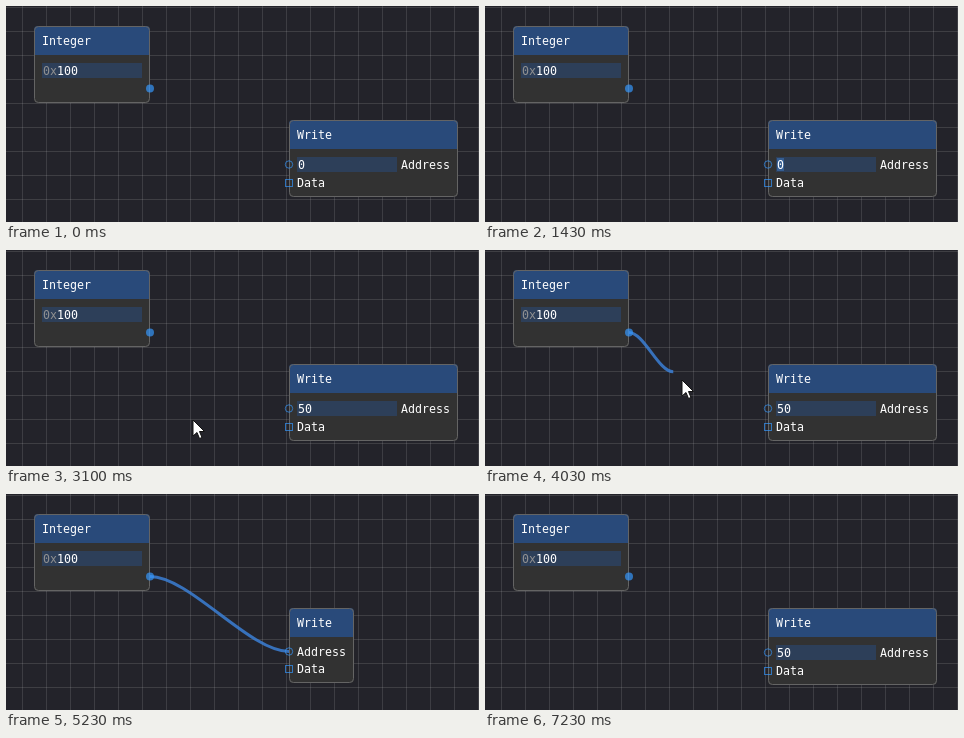
An HTML page with a canvas for the animation above (8000 ms loop, 473 by 216 pixels).

```html
<!DOCTYPE html>
<html>
<head>
<meta charset="utf-8">
<style>
  html, body { margin: 0; width: 100%; height: 100%; overflow: hidden; background: #23232a; }
  canvas { display: block; }
</style>
</head>
<body>
<canvas width="473" height="216"></canvas>
<script>
const ctx = document.querySelector('canvas').getContext('2d');
const LOOP = 8000, STEP = 200 / 3;
const PIN = 'rgba(53,150,250,.7)', PIN_HOVER = '#3596fa';

// Pointer visits as [time, x, y]
const visits = [
  [[500, 345, 189], [1033, 318, 158], [1100, 306, 158], [1300, 256, 158], [1433, 256, 158]],
  [[2966, 204, 205], [3433, 146, 83], [3700, 146, 83], [3766, 150, 86], [4033, 197, 130],
   [4566, 273, 151], [4633, 277, 152], [4766, 281, 157], [4966, 281, 157], [5233, 250, 216]],
  [[6033, 262, 205], [6433, 247, 153], [6633, 245, 148], [6766, 245, 148], [7233, 225, 216]]
];

const between = (t, from, to) => t >= from && t < to;

function pointerAt(t) {
  const path = visits.find(v => between(t, v[0][0], v[v.length - 1][0]));
  if (!path) return null;
  const i = path.findIndex(k => k[0] > t);
  const [t0, x0, y0] = path[i - 1], [t1, x1, y1] = path[i];
  const p = (t - t0) / (t1 - t0);
  return [x0 + (x1 - x0) * p, y0 + (y1 - y0) * p];
}

function rect(color, x, y, w, h) {
  ctx.fillStyle = color;
  ctx.fillRect(x, y, w, h);
}

function text(str, x, y, color = '#fff') {
  ctx.fillStyle = color;
  ctx.fillText(str, x, y);
}

function shape(points, fill, stroke) {
  ctx.beginPath();
  points.forEach(p => ctx.lineTo(...p));
  ctx.closePath();
  ctx.fillStyle = fill;
  ctx.strokeStyle = stroke;
  ctx.lineWidth = 1;
  ctx.fill();
  ctx.stroke();
}

function grid() {
  rect('#23232a', 0, 0, 473, 216);
  for (let x = 16; x < 473; x += 24) rect('rgba(200,200,200,.157)', x, 0, 1, 216);
  for (let y = 1; y < 216; y += 24) rect('rgba(200,200,200,.157)', 0, y, 473, 1);
}

function node(title, x, y, w, h, hover) {
  ctx.beginPath();
  ctx.roundRect(x, y, w, h, 4);
  ctx.fillStyle = hover ? '#4b4b4b' : '#323232';
  ctx.fill();
  ctx.beginPath();
  ctx.roundRect(x, y, w, 29, [4, 4, 0, 0]);
  ctx.fillStyle = hover ? '#4296fa' : '#294a7a';
  ctx.fill();
  ctx.beginPath();
  ctx.roundRect(x + .5, y + .5, w - 1, h - 1, 4);
  ctx.strokeStyle = '#646464';
  ctx.lineWidth = 1;
  ctx.stroke();
  text(title, x + 8, y + 19);
}

function field(x, y) {
  rect('rgba(41,74,122,.54)', x, y, 100, 15);
}

function circle(x, y, color, filled) {
  ctx.beginPath();
  ctx.arc(x, y, filled ? 4 : 3.7, 0, 7);
  ctx.fillStyle = ctx.strokeStyle = color;
  ctx.lineWidth = 1;
  filled ? ctx.fill() : ctx.stroke();
}

function wire(x, y, color) {
  const x0 = 144, y0 = 82.5, bend = Math.hypot(x - x0, y - y0) / 4;
  ctx.beginPath();
  ctx.moveTo(x0, y0);
  ctx.bezierCurveTo(x0 + bend, y0, x - bend, y, x, y);
  ctx.strokeStyle = color;
  ctx.lineWidth = 3;
  ctx.stroke();
}

function pointer(x, y) {
  x = Math.round(x);
  y = Math.round(y);
  if (x >= 291 && x < 391 && y >= 151 && y < 166) {
    ctx.globalCompositeOperation = 'difference';
    rect('#fff', x, y - 6, 1, 13);
    for (const end of [y - 7, y + 7]) {
      rect('#fff', x - 3, end, 3, 1);
      rect('#fff', x + 1, end, 3, 1);
    }
    ctx.globalCompositeOperation = 'source-over';
    return;
  }
  const arrow = [[0, 0], [0, 16], [4, 12.5], [6.5, 18.5], [9, 17.5], [6.5, 11.5], [11.5, 11.5]];
  shape(arrow.map(([dx, dy]) => [x + dx, y + dy]), '#fff', '#111');
}

function draw(t) {
  const linked = between(t, 4960, 6830);
  const snapped = between(t, 4695, 4960);
  const mouse = pointerAt(t);
  const pinY = linked ? 157.5 : 158.5;

  grid();
  if (linked || snapped) wire(283, pinY, between(t, 6495, 6830) ? '#4296fa' : 'rgba(61,133,224,.8)');
  else if (between(t, 3760, 4695)) wire(...pointerAt(t - 50), 'rgba(61,133,224,.8)');

  node('Integer', 28, 20, 116, 77);
  field(36, 57);
  text('0x', 37, 69, '#919191');
  text('100', 51, 69);
  circle(144, 82.5, between(t, 3425, 3760) ? PIN_HOVER : PIN, true);

  node('Write', 283, 114, linked ? 65 : 169, linked ? 75 : 77, between(t, 495, 1430));
  if (linked) {
    text('Address', 291, 162);
    text('Data', 291, 179);
  } else {
    const value = t < 1495 ? '0' : t < 1630 ? '5' : '50';
    field(291, 151);
    if (between(t, 1160, 1495)) rect('rgba(66,150,250,.35)', 292, 152, 7, 13);
    text(value, 292, 163);
    if (between(t, 1495, 2295)) rect('#fff', 292 + 7 * value.length, 153, 1, 11);
    text('Address', 395, 163);
    text('Data', 291, 181);
  }
  circle(283, pinY, snapped ? PIN_HOVER : PIN);
  ctx.strokeStyle = PIN;
  ctx.strokeRect(279.5, linked ? 171.5 : 173.5, 7, 7);

  if (mouse) pointer(...mouse);
}

function frame() {
  const t = performance.now() % LOOP;
  ctx.font = '11.63px "DejaVu Sans Mono", monospace';
  draw(500 + Math.floor((t - 496) / STEP) * STEP);
  requestAnimationFrame(frame);
}
frame();
</script>
</body>
</html>
```
